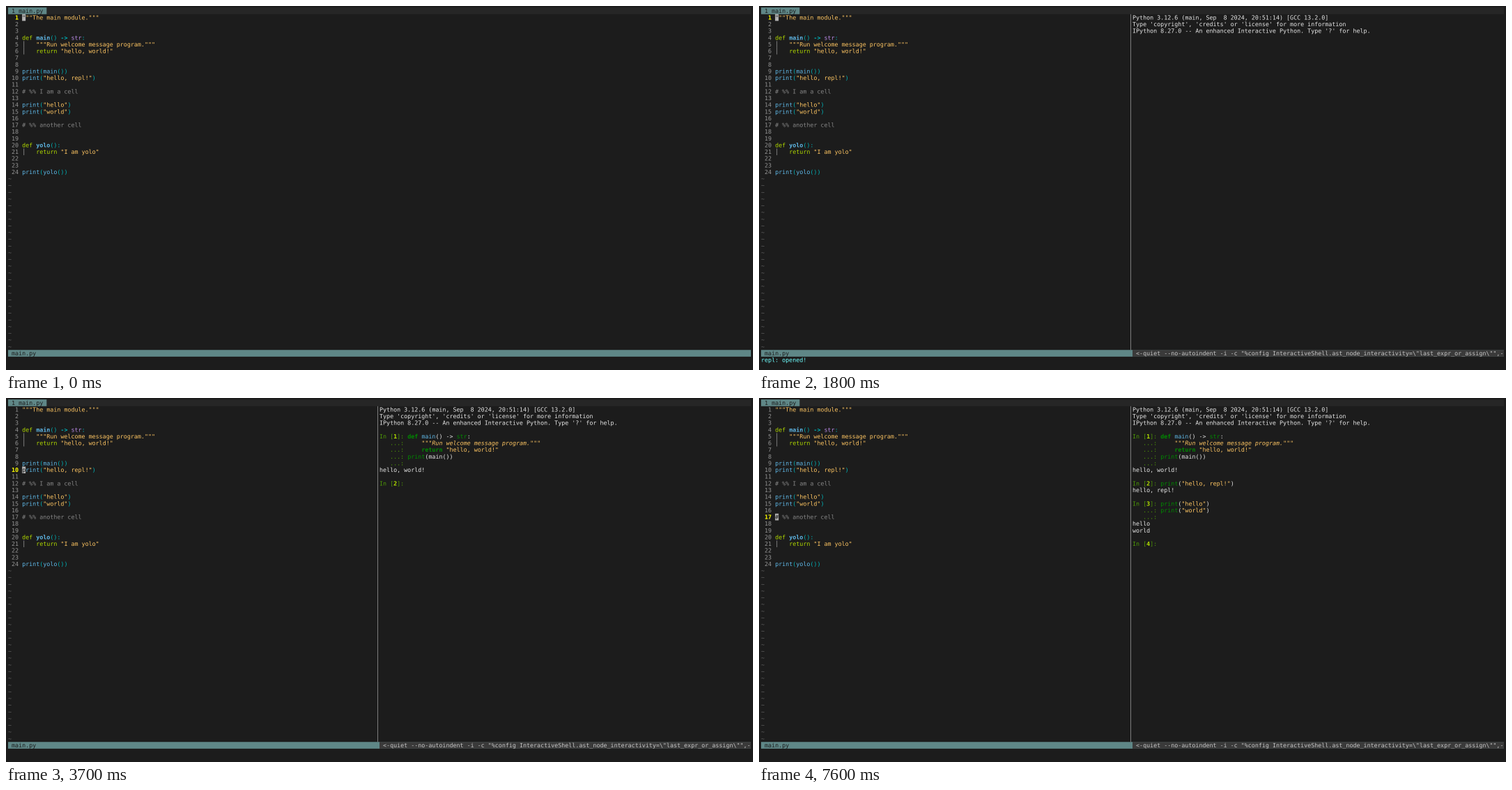
Write an HTML page with a canvas that moves like this. It is 1072 by 522 pixels and loops after 8000 ms.

```html
<!DOCTYPE html>
<html lang="en">
<head>
<meta charset="utf-8">
<title>Editor with a REPL pane</title>
<style>
  html, body { margin: 0; width: 100%; height: 100%; overflow: hidden; background: #1c1c1c; }
  canvas { display: block; width: 100vw; height: 100vh; }
</style>
</head>
<body>
<canvas id="stage" width="2144" height="1044"></canvas>
<script>
const LOOP = 8000;
const COLS = 212, CELL_W = 1066 / COLS, CELL_H = 9.63, LEFT = 3, TOP = 2.1;
const TEXT_COL = 4, PANE_COL = 106, STATUS_ROW = 51;
const BG = '#1c1c1c', TEAL = '#5f8787', CURSOR = '#b2b2b2', SELECTED = '#0087af';

// Markup: {x} switches to style x until the next switch.
const styles = {
  k: ['#afd700'], f: ['#5fb7e6'], F: ['#5fb7e6', 'bold'], p: ['#00b4b9'], P: ['#00b4b9', 'bold'],
  t: ['#b98ae6'], s: ['#ffc663'], S: ['#ffc663', 'italic'], c: ['#868686'], g: ['#868686'],
  n: ['#949494'], N: ['#ffff00', 'bold'], e: ['#626262'], d: [BG], w: ['#e6e6e6'],
  r: ['#4e9a06'], R: ['#b5e000', 'bold'], G: ['#008a00', 'bold'], h: ['#008a00'],
  m: ['#6fffff'], v: ['#ffb45f'], b: ['#c6c6c6']
};

const source = [
  '{s}"""The main module."""', '', '',
  '{k}def {F}main{p}() {P}->{p} {t}str{p}:',
  '{g}│   {s}"""Run welcome message program."""',
  '{g}│   {k}return {s}"hello, world!"', '', '',
  '{f}print{p}({f}main{p}())',
  '{f}print{p}({s}"hello, repl!"{p})', '',
  '{c}# %% I am a cell', '',
  '{f}print{p}({s}"hello"{p})',
  '{f}print{p}({s}"world"{p})', '',
  '{c}# %% another cell', '', '',
  '{k}def {F}yolo{p}():',
  '{g}│   {k}return {s}"I am yolo"', '', '',
  '{f}print{p}({f}yolo{p}())'
];

const prompt = n => `{r}In [{R}${n}{r}]: `;
const more = '{r}   ...: ';
const code = text => ' '.repeat(8) + text;

// Blocks of REPL output: [time, first row, lines]
const output = [
  [1800, 1, [
    '{w}Python 3.12.6 (main, Sep  8 2024, 20:51:14) [GCC 13.2.0]',
    "{w}Type 'copyright', 'credits' or 'license' for more information",
    "{w}IPython 8.27.0 -- An enhanced Interactive Python. Type '?' for help."]],
  [1900, 5, [prompt(1)]],
  [3700, 5, [
    code('{G}def {f}main{w}() -> {h}str{w}:'),
    more + '    {S}"""Run welcome message program."""',
    more + '    {G}return {s}"hello, world!"',
    more + '{h}print{w}(main())',
    more, '{w}hello, world!', '', prompt(2)]],
  [5300, 12, [
    code('{h}print{w}({s}"hello, repl!"{w})'),
    '{w}hello, repl!', '', prompt(3)]],
  [7600, 15, [
    code('{h}print{w}({s}"hello"{w})'),
    more + '{h}print{w}({s}"world"{w})',
    more, '{w}hello', '{w}world', '', prompt(4)]]
];

const paneStatus = String.raw`{b}<-quiet --no-autoindent -i -c "%config InteractiveShell.ast_node_interactivity=\"last_expr_or_assign\"",-`;

// [time, value] steps
const cursorLine = [
  [0, 1], [2100, 2], [2300, 3], [2400, 4], [2900, 5], [3000, 6], [3100, 7], [3200, 8],
  [3400, 9], [3700, 10], [4300, 11], [4700, 10], [5300, 11], [6200, 12], [7600, 17]
];
const commandLine = [
  [0, ''], [500, ':'], [700, ':R'], [800, ':Re'], [900, ':Rep'], [1000, ':Repl'],
  [1500, 'repl: opened!'], [3700, '']
];
const at = (steps, t) => steps.findLast(([start]) => start <= t)[1];

const ctx = document.getElementById('stage').getContext('2d');
ctx.scale(2, 2);
ctx.textRendering = 'geometricPrecision';

const x = col => LEFT + col * CELL_W;
const y = row => TOP + row * CELL_H;

function fill(col, row, cols, color, rows = 1) {
  ctx.fillStyle = color;
  ctx.fillRect(x(col), y(row), cols * CELL_W, rows * CELL_H);
}

function bar(col, row, color, rows = 1) {
  ctx.fillStyle = color;
  ctx.fillRect(x(col) + CELL_W / 2 - 0.4, y(row), 0.9, rows * CELL_H);
}

function write(col, row, markup, override) {
  let style = styles.w;
  markup.split(/\{(\w)\}/).forEach((part, i) => {
    if (i % 2) { style = styles[part]; return; }
    let text = part;
    if (text[0] === '│') {
      bar(col, row, override ? '#4fa5c4' : style[0]);
      text = ' ' + text.slice(1);
    }
    ctx.font = `${style[1] || ''} 8.352px "DejaVu Sans Mono", monospace`;
    ctx.fillStyle = override || style[0];
    ctx.fillText(text, x(col), y(row) + 7.7);
    col += part.length;
  });
}

const plain = markup => markup.replace(/\{\w\}/g, '');

function drawEditor(t) {
  const current = at(cursorLine, t);
  const visual = t >= 2700 && t < 3700;
  const typing = t >= 500 && t < 1500;
  source.forEach((markup, i) => {
    const row = i + 1, text = plain(markup);
    const selected = visual && row >= 4 && row <= current;
    if (selected) fill(TEXT_COL, row, Math.max(1, text.length), SELECTED);
    write(0, row, (row === current ? '{N}' : '{n}') + String(row).padStart(3));
    write(TEXT_COL, row, markup, selected && '#ffffff');
    if (row === current && !typing) {
      fill(TEXT_COL, row, 1, CURSOR);
      write(TEXT_COL, row, '{d}' + text.slice(0, 1));
    }
  });
  for (let row = source.length + 1; row < STATUS_ROW; row++) write(0, row, '{e}~');

  const command = at(commandLine, t);
  write(0, STATUS_ROW + 1, (typing ? '{w}' : '{m}') + command);
  if (typing) fill(command.length, STATUS_ROW + 1, 1, CURSOR);
  if (visual) write(0, STATUS_ROW + 2, '{v}-- VISUAL LINE --');
}

function drawPane(t) {
  bar(PANE_COL - 1, 1, '#8a8a8a', STATUS_ROW - 1);
  fill(PANE_COL, STATUS_ROW, COLS - PANE_COL, '#3a3a3a');
  write(PANE_COL + 1, STATUS_ROW, paneStatus);
  for (const [start, row, lines] of output) {
    if (t >= start) lines.forEach((line, i) => write(PANE_COL, row + i, line));
  }
}

function draw(now) {
  const t = now % LOOP;
  ctx.fillStyle = BG;
  ctx.fillRect(0, 0, 1072, 522);
  fill(0, 0, COLS, '#262626');
  fill(0, 0, 11, TEAL);
  write(1, 0, '{d}1 main.py');
  fill(0, STATUS_ROW, COLS, TEAL);
  write(1, STATUS_ROW, '{d}main.py');
  drawEditor(t);
  if (t >= 1500) drawPane(t);
}

const begin = performance.now();
function frame() {
  draw(performance.now() - begin);
  requestAnimationFrame(frame);
}
frame();
</script>
</body>
</html>
```
